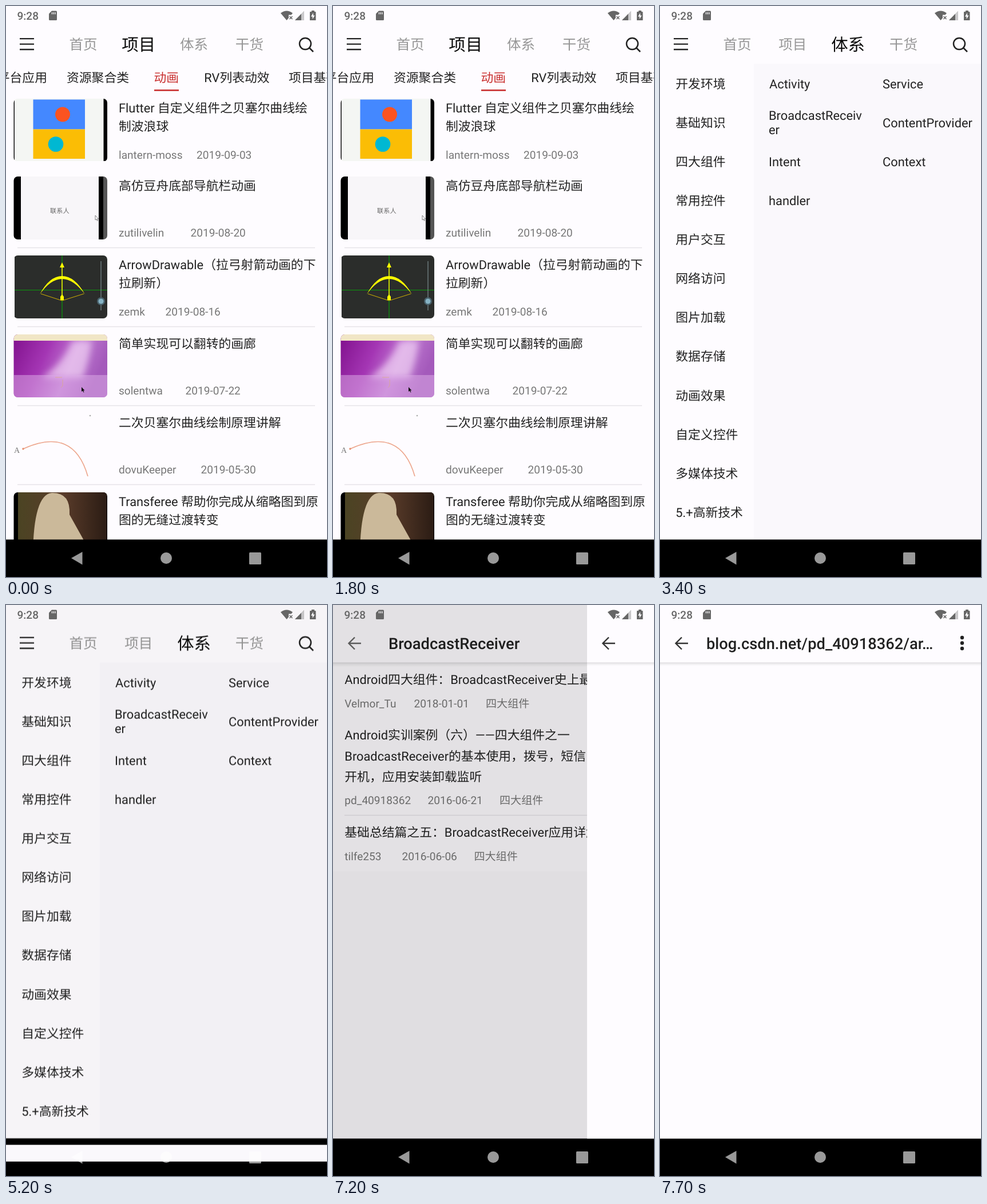
An HTML page that plays this animation: 561 px wide and 998 px high, repeating every 8000 ms.

```html
<!DOCTYPE html>
<html lang="zh-CN">
<head>
<meta charset="utf-8">
<title>App tour</title>
<style>
  html, body { margin: 0; width: 100%; height: 100%; overflow: hidden; background: #000; }
  svg { display: block; width: 561px; height: 998px; }
  text {
    font-family: Roboto, "Noto Sans CJK SC", "Noto Sans CJK", sans-serif;
    white-space: pre; text-rendering: geometricPrecision;
  }
</style>
</head>
<body>
<svg viewBox="0 0 561 998">
  <defs>
    <linearGradient id="shadow" x2="0" y2="1">
      <stop stop-opacity=".15"/><stop offset=".3" stop-opacity=".07"/><stop offset="1" stop-opacity="0"/>
    </linearGradient>
    <linearGradient id="sky" x2="1" y2=".3">
      <stop stop-color="#80108c"/><stop offset=".4" stop-color="#a436b4"/>
      <stop offset=".7" stop-color="#c07ad2"/><stop offset="1" stop-color="#a45abb"/>
    </linearGradient>
    <linearGradient id="wood" x2="1">
      <stop stop-color="#4b4423"/><stop offset=".5" stop-color="#5a3c2a"/><stop offset="1" stop-color="#2b1c14"/>
    </linearGradient>
    <filter id="soft" x="-50%" y="-50%" width="200%" height="200%"><feGaussianBlur stdDeviation="6"/></filter>
    <clipPath id="reveal"><rect id="revealBox" width="561" height="998"/></clipPath>
    <clipPath id="thumb"><rect x="13.5" width="163.5" height="110" rx="7"/></clipPath>
    <path id="back" d="M49 67H28M38 56.500L27.500 67L38 77.500" fill="none" stroke-width="2.400"/>
    <path id="cursor" d="M0 0V8L2 6.500L3.500 9.500L4.500 9L3.200 6H5.500Z"/>
  </defs>

  <g id="main">
    <rect width="561" height="933" fill="#fefcff"/>
    <g id="pager"><g id="projects"></g><g id="topics" transform="translate(561)"></g></g>
    <rect width="561" height="101" fill="#fefcff"/>
    <path d="M24 57.200H49M24 66.600H49M24 76H49" stroke="#222" stroke-width="2.300"/>
    <g fill="none" stroke="#222" stroke-width="2.500"><circle cx="523" cy="66" r="10"/><path d="M530 73L537 80"/></g>
    <g id="tabs"></g>
    <rect y="932.500" width="561" height="66"/>
  </g>

  <g id="detail">
    <rect width="561" height="933" fill="#faf8fc"/>
    <rect width="561" height="465.500" fill="#fefcff"/>
    <rect y="100.500" width="561" height="8" fill="url(#shadow)"/>
    <use href="#back" stroke="#666"/>
    <g id="articles"></g>
    <rect y="932.500" width="561" height="66"/>
  </g>

  <rect id="dim" width="561" height="932.500"/>

  <g id="web">
    <rect width="561" height="932.500" fill="#fefcff"/>
    <rect y="100.500" width="561" height="6" fill="url(#shadow)"/>
    <use href="#back" stroke="#333"/>
    <g fill="#222"><circle cx="528" cy="57" r="3.200"/><circle cx="528" cy="66.500" r="3.200"/><circle cx="528" cy="76" r="3.200"/></g>
    <g id="address"></g>
  </g>

  <g id="status" fill="#666">
    <text x="19.500" y="23.500" font-size="19" font-weight="500">9:28</text>
    <path d="M80 8.500H87.500Q89 8.500 89 10V23.500Q89 25 87.500 25H76.500Q75 25 75 23.500V13.500Z"/>
    <path d="M80.500 11V14.500M83.300 11V14.500M86 11V14.500" stroke="#fefcff" stroke-width="1.300"/>
    <path d="M480 12.500Q490.500 4.500 501 12.500L498.500 15.500H494V21L490.500 25Z"/>
    <path d="M495.500 18L500.500 23M500.500 18L495.500 23" stroke="#666" stroke-width="1.500"/>
    <path d="M521 8.500V25H505Z" opacity=".35"/><path d="M516 13.700V25H505Z"/>
    <path d="M534 8H539V10H540.500Q541.500 10 541.500 11V25H531V11Q531 10 532 10H534Z"/>
    <path d="M537 12L533 18.500H535.700V23L539.600 16.500H537Z" fill="#fefcff"/>
  </g>
  <g fill="#fff" opacity=".6">
    <path d="M114 965L133.500 954V976.500Z"/><circle cx="280" cy="965" r="10"/>
    <rect x="425" y="955" width="21" height="21" rx="1.500"/>
  </g>
</svg>

<script>
const $ = id => document.getElementById(id);
const BODY = 21.82, META = 19.09, TITLE = 27.27, TAB = 24.55;
const text = (x, y, s, size = BODY, fill = '#222', more = '') =>
  `<text x="${x}" y="${y}" font-size="${size}" fill="${fill}" ${more}>${s}</text>`;
const meta = (x, y, s) => text(x, y, s, META, '#777');
const line = y => `<path d="M20 ${y}H540" stroke="#e5e3e8" stroke-width="1.400"/>`;
const rect = (x, y, w, h, fill, more = '') =>
  `<rect x="${x}" y="${y}" width="${w}" height="${h}" fill="${fill}" ${more}/>`;
const disc = (x, y, r, fill) => `<circle cx="${x}" cy="${y}" r="${r}" fill="${fill}"/>`;

// Thumbnails, drawn with y = 0 at their top edge
const thumbs = [
  rect(13, 0, 164, 109, '#f4f6f3') + rect(13, 0, 2, 109, '#111') + rect(170.5, 0, 7, 109, '#000') +
    rect(47.5, 1.5, 90.5, 52, '#4488ff') + rect(47.5, 53.5, 90.5, 51.5, '#fbbd05') +
    disc(99, 27.5, 13, '#fb5320') + disc(87, 79.5, 13.3, '#00b8d2'),
  rect(13, 0, 164, 110, '#f8f6f9') + rect(13, 0, 13, 110, '#000') + rect(162, 0, 8, 110, '#000') +
    rect(170, 0, 7, 110, '#555') + text(77, 64, '联系人', 11.2, '#666') +
    '<use href="#cursor" x="156" y="68" fill="#fff" stroke="#666" stroke-width=".8"/>',
  rect(15, 0, 162, 110, '#2b2d2b') +
    '<path d="M15 60.500H177M98 0V110" stroke="#0b9a0b" stroke-width="1.200"/>' +
    '<path d="M61 67L98 79L136 67" fill="none" stroke="#d0b000"/>' +
    '<path d="M98 18V76" stroke="#ee0" stroke-width="1.600"/>' +
    '<path d="M59 68Q76 36 98 36T138 68Q118 41 98 41T59 68ZM98 12L102 21H94ZM95 72L98 68L101 72V78H95Z" fill="#ff0"/>' +
    '<path d="M166 10V96" stroke="#7b8b90" stroke-width="1.200"/>' +
    disc(166, 80, 7, '#49616b') + disc(166, 80, 4.5, '#86b3c4'),
  rect(13, 0, 164, 110, 'url(#sky)') +
    '<path d="M62 76Q98 54 116 11H150Q146 44 134 76Z" fill="#f6dcf8" opacity=".65" filter="url(#soft)"/>' +
    rect(13, 0, 164, 11, '#f1e6c6') + rect(13, 71, 164, 39, '#dfb0ea', 'opacity=".5"') +
    '<path d="M86 75H98M99 79V90L96 93" fill="none" stroke="#dcae7a" opacity=".7"/>' +
    '<use href="#cursor" x="132" y="92" fill="#111"/>',
  text(14, 69, 'A', 14, '#777', 'style="font-family:Liberation Serif,serif"') +
    '<path d="M30 62Q118 22 143 110" fill="none" stroke="#eda78e" stroke-width="1.700"/>' +
    disc(30, 62, 1.8, '#e5906f') + disc(147, 4, 1.3, '#aaa'),
  rect(13, 0, 164, 110, '#000') + rect(21, 0, 155, 110, 'url(#wood)') +
    '<path d="M47 110Q48 4 80 1Q113 0 111 39L135 82V110Z" fill="#cbb99a"/>'
];

const projects = [
  ['Flutter 自定义组件之贝塞尔曲线绘', '制波浪球', 'lantern-moss', 334, '2019-09-03'],
  ['高仿豆舟底部导航栏动画', '', 'zutilivelin', 323.5, '2019-08-20'],
  ['ArrowDrawable（拉弓射箭动画的下', '拉刷新）', 'zemk', 279.5, '2019-08-16'],
  ['简单实现可以翻转的画廊', '', 'solentwa', 314.5, '2019-07-22'],
  ['二次贝塞尔曲线绘制原理讲解', '', 'dovuKeeper', 341.5, '2019-05-30'],
  ['Transferee 帮助你完成从缩略图到原', '图的无缝过渡转变', '', 0, '']
];
$('projects').innerHTML =
  [[-15.3, '平台应用'], [106, '资源聚合类'], [346.3, 'RV列表动效'], [494, '项目基础']]
    .map(([x, s]) => text(x, 133.3, s)).join('') +
  text(258.5, 133.3, '动画', BODY, '#c9302f') + rect(259, 146, 43, 2.6, '#c9302f') +
  projects.map(([a, b, author, dateX, date], i) => {
    const y = i ? 160 + 138 * i : 162;
    return `<g transform="translate(0 ${y})"><g clip-path="url(#thumb)">${thumbs[i]}</g>` +
      text(197, 24.4, a) + text(197, 56.4, b) + meta(197, 104.5, author) + meta(dateX - 1, 104.5, date) +
      (i > 1 ? line(-13.5) : '') + '</g>';
  }).join('');

const topics = ['开发环境', '基础知识', '四大组件', '常用控件', '用户交互', '网络访问',
  '图片加载', '数据存储', '动画效果', '自定义控件', '多媒体技术', '5.+高新技术'];
$('topics').innerHTML = rect(0, 101, 561, 832, '#fefcff') + rect(164, 101, 397, 832, '#faf8fc') +
  topics.map((s, i) => text(27.3, 143.7 + 68.1 * i, s)).join('') +
  [[191, 143.5, 'Activity'], [389, 143.5, 'Service'], [190, 199, 'BroadcastReceiv'], [190, 224, 'er'],
    [389, 211.5, 'ContentProvider'], [190, 280, 'Intent'], [389, 280, 'Context'], [190, 348, 'handler']]
    .map(a => text(...a)).join('');

$('tabs').innerHTML = ['首页', '项目', '体系', '干货']
  .map(s => text(0, 9.3, s, TAB, '#999', 'text-anchor="middle"')).join('');

$('articles').innerHTML = text(97, 77, 'BroadcastReceiver', TITLE, '#222', 'font-weight="500"') +
  [[138.4, 'Android四大组件：BroadcastReceiver史上最全面解析'],
    [235, 'Android实训案例（六）——四大组件之一'],
    [271.5, 'BroadcastReceiver的基本使用，拨号，短信，SD卡，'],
    [307.8, '开机，应用安装卸载监听'],
    [405.3, '基础总结篇之五：BroadcastReceiver应用详解']].map(([y, s]) => text(20.3, y, s)).join('') +
  [[178.5, 'Velmor_Tu', 141.5, '2018-01-01', 267], [348, 'pd_40918362', 165.5, '2016-06-21', 291],
    [445.5, 'tilfe253', 120.5, '2016-06-06', 246.5]]
    .map(([y, who, dateX, date, tagX]) => meta(20.3, y, who) + meta(dateX, y, date) + meta(tagX, y, '四大组件')).join('') +
  line(367.5);

$('address').innerHTML = text(81, 77, 'blog.csdn.net/pd_40918362/ar…', TITLE, '#222', 'font-weight="500"');

const clamp = v => Math.min(1, Math.max(0, v));
const bezier = ([a, b, c, d], s) => {
  const r = 1 - s;
  return a * r * r * r + 3 * b * r * r * s + 3 * c * r * s * s + d * s * s * s;
};
const curve = (x, xs, ys) => {
  let lo = 0, hi = 1;
  for (let i = 0; i < 30; i++) {
    const mid = (lo + hi) / 2;
    if (bezier(xs, mid) < x) lo = mid; else hi = mid;
  }
  return bezier(ys, hi);
};
const fastOutSlowIn = x => curve(x, [0, .4, .2, 1], [0, 0, 1, 1]);
const fastOutExtraSlowIn = x => x < 1 / 6
  ? curve(x, [0, .05, .13333, .16667], [0, 0, .06, .4])
  : curve(x, [.16667, .20833, .25, 1], [.4, .82, 1, 1]);

const set = (id, name, value) => $(id).setAttribute(name, value);
const show = (id, on) => set(id, 'visibility', on ? 'visible' : 'hidden');

function draw(t) {
  // Swipe from the project page to the topic page
  const page = 1 - (1 - clamp((t - 3170) / 200)) ** 5;
  set('pager', 'transform', `translate(${-561 * page})`);
  [...$('tabs').children].forEach((tab, i) => {
    const focus = clamp(1 - Math.abs(i - 1 - page)), grey = 150 - 140 * focus;
    tab.setAttribute('transform', `translate(${135 + 96.8 * i} 67) scale(${1 + .2 * focus})`);
    tab.setAttribute('fill', `rgb(${grey},${grey},${grey})`);
  });

  // The article list is revealed from the bottom
  const open = clamp((t - 5166) / 425), rise = fastOutSlowIn(open);
  set('main', 'transform', `translate(0 ${-20 * rise})`);
  set('main', 'opacity', 1 - .1 * clamp((t - 5166) / 117));
  show('detail', open > 0);
  set('detail', 'transform', `translate(0 ${40.9 * (1 - rise)})`);
  if (open < 1) set('detail', 'clip-path', 'url(#reveal)'); else $('detail').removeAttribute('clip-path');
  set('revealBox', 'y', 957 * (1 - fastOutExtraSlowIn(open)));

  // The web page slides in over the dimmed list
  const slide = 1 - (1 - clamp((t - 7167) / 300)) ** 2;
  set('dim', 'opacity', .5 * slide);
  show('web', slide > 0);
  set('web', 'transform', `translate(${Math.round(561 * (1 - slide))})`);
  set('address', 'display', t >= 7700 ? 'inline' : 'none');
}

function tick(now) {
  draw(Math.floor(now % 8000 / 100) * 100);
  requestAnimationFrame(tick);
}
draw(0);
requestAnimationFrame(tick);
</script>
</body>
</html>
```
